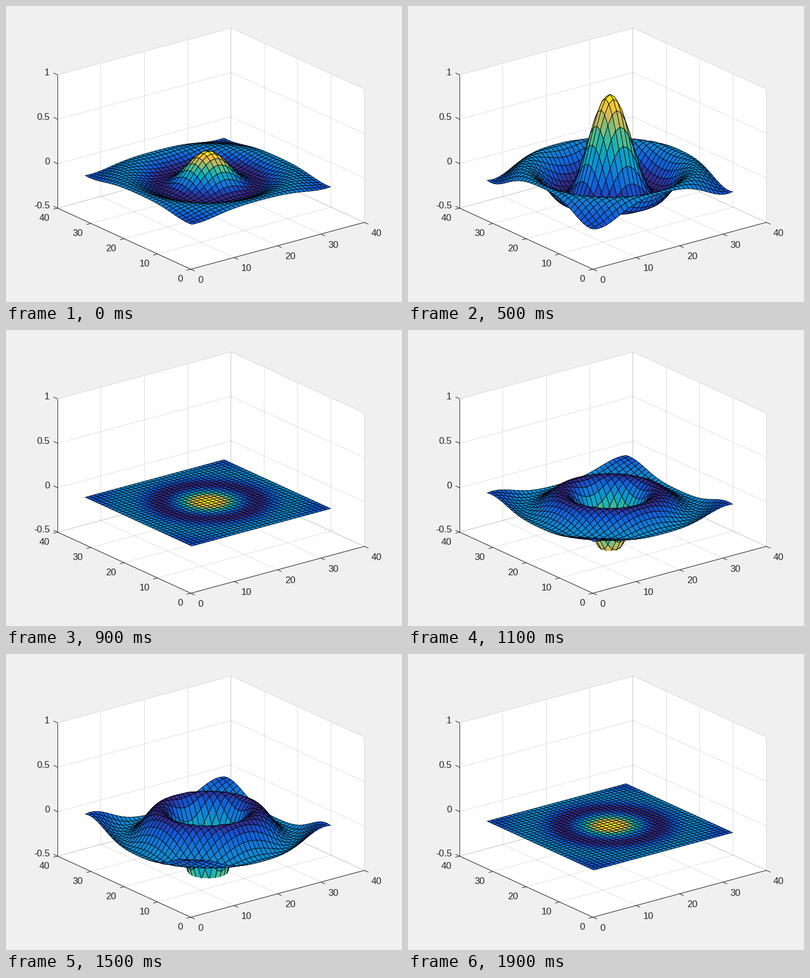
Recreate the animation shown at these times as a matplotlib script. Size 700 by 525 pixels, loop 2 s.

```python
import numpy as np
import matplotlib.pyplot as plt
from matplotlib.animation import FuncAnimation
from matplotlib.collections import PolyCollection
from matplotlib.colors import LinearSegmentedColormap

W, H, DPI = 700, 525, 100
PX = 72 / DPI
FRAMES = 20
SIZE, FLOOR, CEIL = 40, -0.5, 1
INK = (0.15, 0.15, 0.15)

# Orthographic view, stretched to fill the plot box
AZ, EL = np.radians(37.5), np.radians(30)
LEFT, TOP, BOX_W, BOX_H = 91.2, 38.975, 542.2, 427.875
SX = BOX_W / (np.cos(AZ) + np.sin(AZ))
SY = BOX_H / (np.sin(EL) * (np.cos(AZ) + np.sin(AZ)) + np.cos(EL))
X_VEC = np.array([SX * np.cos(AZ), -SY * np.sin(EL) * np.sin(AZ)])
Y_VEC = np.array([-SX * np.sin(AZ), -SY * np.sin(EL) * np.cos(AZ)])
Z_VEC = np.array([0, -SY * np.cos(EL)])
ORIGIN = np.array([LEFT - Y_VEC[0], TOP + BOX_H])

COLORS = LinearSegmentedColormap.from_list("ripple", [
    "#352a87", "#0f5cdd", "#127dd8", "#079ccf", "#15b1b4",
    "#59bd8c", "#a5be6b", "#e1b952", "#fcce2e", "#f9fb0e"], N=64)


def project(x, y, z):
    """Data coordinates to stage pixels."""
    x, y, z = (np.asarray(v, float)[..., None] for v in (x, y, z))
    height = (z - FLOOR) / (CEIL - FLOOR)
    return ORIGIN + x / SIZE * X_VEC + y / SIZE * Y_VEC + height * Z_VEC


def clip_floor(quad):
    """Part of a quad above the floor, left open along the cut."""
    below = [p[2] < FLOOR for p in quad]
    if not any(below):
        return quad + quad[:1]
    if all(below):
        return None
    start = next(i for i in range(4) if below[i] and not below[(i + 1) % 4])
    ring = [quad[(start + i) % 4] for i in range(5)]
    out = []
    for a, b in zip(ring, ring[1:]):
        if (a[2] < FLOOR) != (b[2] < FLOOR):
            t = (FLOOR - a[2]) / (b[2] - a[2])
            out.append(tuple(u + t * (v - u) for u, v in zip(a, b)))
        if b[2] >= FLOOR:
            out.append(b)
    return out


# Ripple sin(r)/r; colours follow its shape, not its current height
axis = np.arange(-8, 8.25, 0.5)
gx, gy = np.meshgrid(axis, axis)
wave = np.sinc(np.hypot(gx, gy) / np.pi)
shade = COLORS((wave - wave.min()) / (wave.max() - wave.min()))
far_to_near = range(len(axis) - 2, -1, -1)


def surface(scale):
    """Outlines and colours of all visible faces, far to near."""
    z = wave * scale
    verts, colors = [], []
    for r in far_to_near:
        for c in far_to_near:
            corners = ((r, c), (r, c + 1), (r + 1, c + 1), (r + 1, c))
            face = clip_floor([(j + 1, i + 1, z[i, j]) for i, j in corners])
            if face:
                verts.append(project(*np.array(face).T))
                colors.append(shade[r, c])
    return verts, colors


fig = plt.figure(figsize=(W / DPI, H / DPI), dpi=DPI, facecolor="#f0f0f0")
ax = fig.add_axes([0, 0, 1, 1])
ax.set_xlim(0, W)
ax.set_ylim(H, 0)
ax.axis("off")


def add_lines(segments, alpha, order):
    for a, b in segments:
        xs, ys = np.transpose([a, b])
        if abs(xs[0] - xs[1]) < 1e-6:
            xs = np.floor(xs) + 0.4  # keep uprights on one pixel column
        ax.plot(xs, ys, color=INK, alpha=alpha, lw=PX,
                solid_capstyle="butt", zorder=order)


def label(value, point, ha):
    ax.text(*point, f"{value:g}", ha=ha, va="baseline", color=INK,
            family="Liberation Sans", size=12, zorder=5)


def seg(a, b):
    return project(*a), project(*b)


# Walls and floor
hull = [(0, 0, FLOOR), (SIZE, 0, FLOOR), (SIZE, 0, CEIL),
        (SIZE, SIZE, CEIL), (0, SIZE, CEIL), (0, SIZE, FLOOR)]
ax.add_collection(PolyCollection([[project(*p) for p in hull]],
                                 facecolors="white", edgecolors="none", zorder=0))

# Grid, axis lines, ticks and labels
x_out = np.array([7.2, 3.3])
y_out = np.array([-7.5, 2.0])
grid = []
rules = [seg((0, 0, FLOOR), (SIZE, 0, FLOOR)),
         seg((0, 0, FLOOR), (0, SIZE, FLOOR)),
         seg((0, SIZE, FLOOR), (0, SIZE, CEIL))]
for t in range(0, SIZE + 1, 10):
    grid += [seg((t, SIZE, FLOOR), (t, SIZE, CEIL)),
             seg((SIZE, t, FLOOR), (SIZE, t, CEIL)),
             seg((t, 0, FLOOR), (t, SIZE, FLOOR)),
             seg((0, t, FLOOR), (SIZE, t, FLOOR))]
    px, py = project(t, 0, FLOOR), project(0, t, FLOOR)
    rules += [(px, px + x_out), (py, py + y_out)]
    label(t, px + (12.7, 24.2), "left")
    label(t, py + (-14, 22.2), "right")
for t in np.arange(FLOOR, CEIL + 0.1, 0.5):
    grid += [seg((0, SIZE, t), (SIZE, SIZE, t)), seg((SIZE, 0, t), (SIZE, SIZE, t))]
    pz = project(0, SIZE, t)
    rules.append((pz, pz - x_out))
    label(t, pz + (-13.7, 0.8), "right")
add_lines(grid, 0.15, 1)
add_lines(rules, 1, 2)

mesh = PolyCollection([], closed=False, edgecolors="black", linewidths=0.8 * PX,
                      joinstyle="round", zorder=3)
ax.add_collection(mesh, autolim=False)


def update(k):
    verts, colors = surface(np.sin(2 * np.pi * (k + 1) / FRAMES))
    mesh.set_verts(verts, closed=False)
    mesh.set_facecolor(colors)
    return (mesh,)


anim = FuncAnimation(fig, update, frames=FRAMES, init_func=lambda: update(0),
                     interval=100, repeat=True, repeat_delay=0, blit=False)
plt.show()
```
